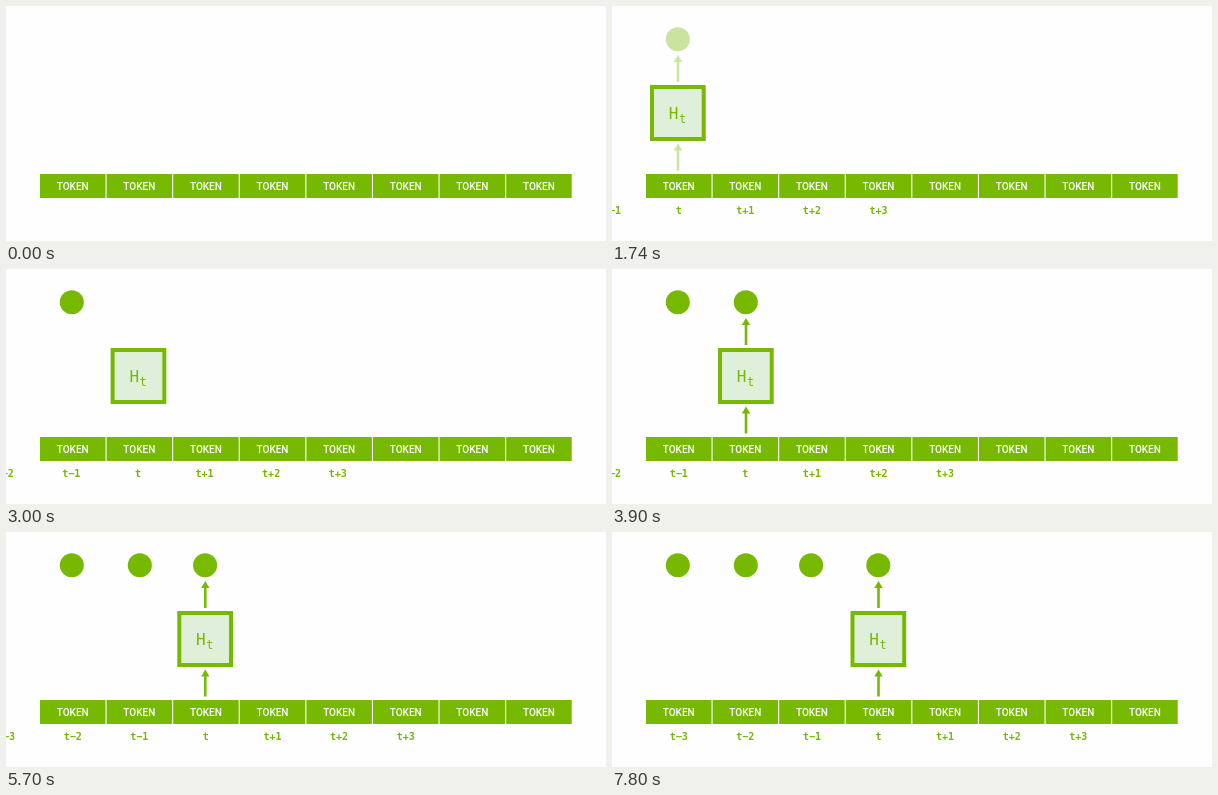
Recreate the animation shown at these times as an HTML page. Size 600 by 235 pixels, loop 8 s.

```html
<!DOCTYPE html>
<html lang="en">
<head>
<meta charset="utf-8">
<title>Token sequence</title>
<style>
  html, body { margin: 0; width: 100%; height: 100%; overflow: hidden; background: #fefdff; }
  svg { display: block; width: 600px; height: 235px; fill: #76b900; text-anchor: middle; }
  .token { font: 500 10px Roboto, sans-serif; fill: #fff; }
  .label { font: bold 10px "DejaVu Sans Mono", monospace; }
  .state { font: 16px "DejaVu Sans Mono", monospace; text-anchor: start; }
  .sub { font-size: 12px; }
  .frame { fill: #e0efd9; stroke: #76b900; stroke-width: 4; }
</style>
</head>
<body>
<svg viewBox="0 0 600 235">
  <g id="tokens"></g>
  <g id="labels"></g>
  <g id="outputs"></g>
  <g id="box">
    <rect class="frame" x="-26" y="81" width="51.7" height="52"/>
    <text class="state" x="-9.2" y="113">H<tspan class="sub" x="1" y="116.5">t</tspan></text>
  </g>
</svg>
<script>
const LOOP = 8000, CELL = 66.6, FIRST = 66.7;
const STOPS = [66, 134, 199.3, 266.5];

const clamp = p => Math.min(1, Math.max(0, p));
const progress = (time, start, duration) => clamp((time - start) / duration);
const easeOut = p => 1 - (1 - p) ** 3;

function bezier(x1, y1, x2, y2) {
  const curve = (a, b, u) => 3 * (1 - u) ** 2 * u * a + 3 * (1 - u) * u * u * b + u ** 3;
  return p => {
    let low = 0, high = 1;
    for (let i = 0; i < 20; i++) {
      const mid = (low + high) / 2;
      if (curve(x1, x2, mid) < p) low = mid; else high = mid;
    }
    return curve(y1, y2, low);
  };
}

const ease = bezier(.25, .1, .25, 1);
const MOVES = [
  { start: 2430, duration: 700, ease },
  { start: 4170, duration: 700, ease },
  { start: 6310, duration: 600, ease: bezier(.1, .35, .2, 1) }
];
const REVEALS = [
  { start: 1670, duration: 490 },
  { start: 3540, duration: 360 },
  { start: 5340, duration: 480 },
  { start: 7380, duration: 420 }
];

const byId = id => document.getElementById(id);
function add(parent, name, attributes, text = "") {
  const node = document.createElementNS("http://www.w3.org/2000/svg", name);
  for (const key in attributes) node.setAttribute(key, attributes[key]);
  node.textContent = text;
  return parent.appendChild(node);
}

for (let i = 0; i < 8; i++) {
  const x = FIRST + i * CELL;
  add(byId("tokens"), "rect", { x: x - 32.7, y: 168, width: 65.5, height: 24 });
  add(byId("tokens"), "text", { x, y: 184, class: "token" }, "TOKEN");
}

for (let i = -3; i <= 3; i++) {
  const name = i ? `t${i < 0 ? "−" : "+"}${Math.abs(i)}` : "t";
  add(byId("labels"), "text", { x: FIRST + i * CELL, y: 208, class: "label" }, name);
}

const arrow = (x, y) => `M${x} ${y}l4.2 7h-2.9v20h-2.6v-20h-2.9z`;
const outputs = STOPS.map(x => ({
  circle: add(byId("outputs"), "circle", { cx: x - .2, cy: 33.2, r: 12 }),
  arrows: add(byId("outputs"), "path", { d: arrow(x, 49) + arrow(x, 137.5) })
}));

function draw(time) {
  const intro = easeOut(progress(time, 620, 640));
  let boxX = STOPS[0], steps = 0;
  MOVES.forEach((move, i) => {
    const p = move.ease(progress(time, move.start, move.duration));
    boxX += p * (STOPS[i + 1] - STOPS[i]);
    steps += p;
  });
  byId("box").setAttribute("transform", `translate(${boxX} 0)`);
  byId("labels").setAttribute("transform", `translate(${steps * CELL} 0)`);
  byId("box").setAttribute("opacity", intro);
  byId("labels").setAttribute("opacity", intro);

  outputs.forEach(({ circle, arrows }, i) => {
    const shown = easeOut(progress(time, REVEALS[i].start, REVEALS[i].duration));
    const gone = MOVES[i] ? progress(time, MOVES[i].start, 120) : 0;
    circle.setAttribute("opacity", shown);
    arrows.setAttribute("opacity", shown * (1 - gone));
  });
}

const origin = performance.now();
function tick() {
  draw((performance.now() - origin) % LOOP);
  requestAnimationFrame(tick);
}
tick();
</script>
</body>
</html>
```
